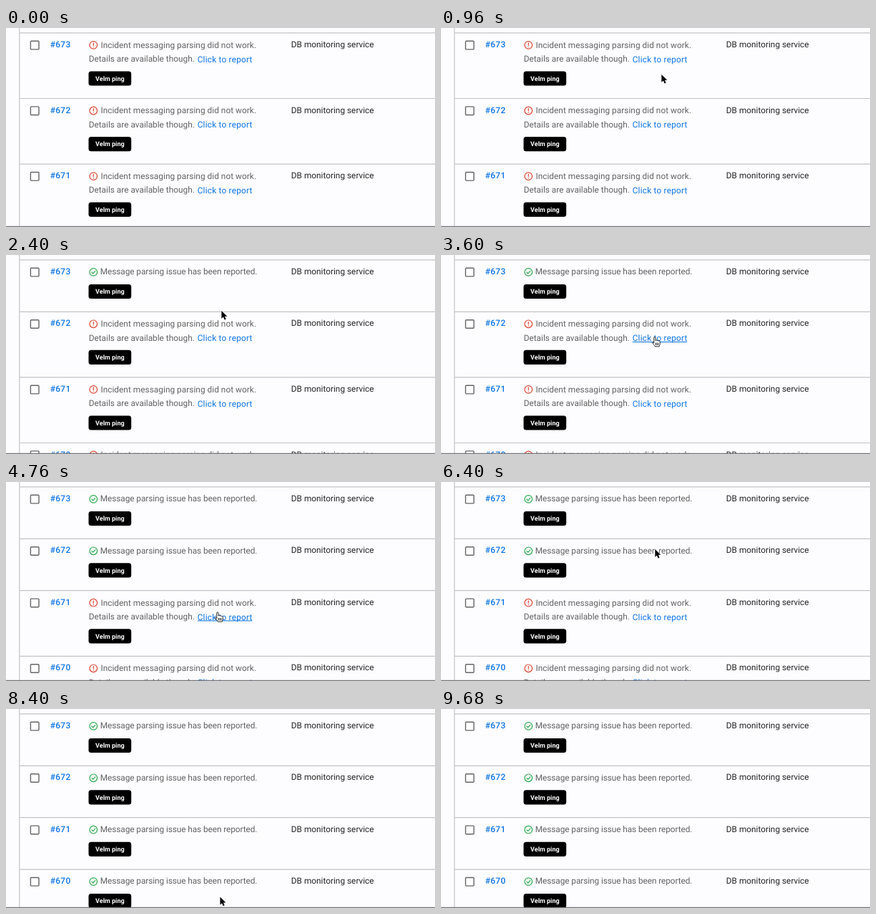
Animation, 600 px wide and 278 px high, one loop 9.76 s. Source, as an HTML page:

```html
<!DOCTYPE html>
<html lang="en">
<head>
<meta charset="utf-8">
<title>Incident list</title>
<style>
  html, body { margin: 0; width: 100%; height: 100%; overflow: hidden; background: #fdfcfe; }
  svg { display: block; width: 600px; height: 278px; }
  text { font: 11.85px Roboto, "Noto Sans", sans-serif; fill: #636363; white-space: pre; text-rendering: geometricPrecision; }
  .id { fill: #0b74e5; font-weight: 500; letter-spacing: .3px; }
  .link { fill: #0b74e5; letter-spacing: .2px; }
  .service { fill: #262626; }
  .open-text { letter-spacing: .03px; }
  .done-text { letter-spacing: -.08px; }
  .label { font-size: 9px; font-weight: 700; fill: #fff; text-anchor: middle; }
  .rule { stroke: #c3c3c7; stroke-width: 1.2; }
  .box { fill: #fff; stroke: #666; stroke-width: 1.4; }
  .icon { fill: none; stroke-width: 1.2; stroke-linecap: round; stroke-linejoin: round; }
  .warn { stroke: #dc4632; }
  .ok { stroke: #2aa84c; }
  .underline { stroke: #0b74e5; stroke-width: 1; }
</style>
</head>
<body>
<svg viewBox="0 0 600 278">
  <rect width="600" height="278" fill="#fdfcfe"/>
  <g id="rows"></g>
  <path class="rule" d="M18.8 0V278"/>
  <path d="M0 277.4H600" stroke="#77777b" stroke-width="1.2"/>
  <g id="cursor">
    <path id="arrow" transform="translate(.4 .9) scale(.93)"
      d="M0 0V11.8L2.7 9.3L4.6 13.6L6.7 12.7L4.9 8.5H8.6Z"
      stroke="#fff" paint-order="stroke" stroke-linejoin="round"/>
    <g id="hand" stroke="#111" stroke-width=".9" stroke-linejoin="round" stroke-linecap="round">
      <path fill="#fff" d="M-1.2 7.5V.4C-1.2-1.2 1.1-1.2 1.1.4V4.2C1.4 3.2 3.2 3.3 3.3 4.5C3.7 3.7 5.3 3.9 5.4 5C5.9 4.4 7.4 4.7 7.4 5.9V8.5C7.4 10 6.4 10.6 6.2 12.5H.3C-.1 10.8-2.2 9.5-3.2 7.6C-3.9 6.2-2.4 5.6-1.2 7.5Z"/>
      <path fill="none" d="M1.4 7.7V10.3M3.2 7.7V10.3M5 7.7V10.3"/>
    </g>
  </g>
</svg>
<script>
const LOOP = 9760, STEP = 40;
const TOP = 6.9, OPEN_HEIGHT = 91.6, DONE_HEIGHT = 72.4;
const REST = 480;
const clicks = [1720, 3840, 7080, 8280];

// Rows above a link are already reported when the pointer reaches it.
const linkY = i => TOP + i * DONE_HEIGHT + 36;

// Time, x and y: the pointer rests on each link before its click.
const visits = clicks.flatMap((t, i) => [[t - REST, 299, linkY(i)], [t, 299, linkY(i)]]);
const path = [
  ...visits,
  [0, 440, 292], [960, 308, 64],
  [2400, 301, 77], [2960, 299, linkY(1)],
  [4440, 299, linkY(1)], [4760, 296, linkY(2) - 5],
  [5480, 300, 240], [6400, 299, 93],
  [7680, 293, 213], [9200, 300, 292], [LOOP, 300, 292]
].sort((a, b) => a[0] - b[0]);

const $ = id => document.getElementById(id);
const show = (el, on) => el.style.display = on ? "" : "none";

const button = y => `
  <rect x="115.5" y="${y}" width="59.7" height="20.2" rx="3.5"/>
  <text class="label" x="145.4" y="${y + 13.4}">Velm ping</text>`;

const icon = (kind, mark) => `
  <g class="icon ${kind}"><circle cx="122.3" cy="17" r="5.3"/><path d="${mark}"/></g>`;

const rowMarkup = id => `
  <path class="rule" d="M19 0H600"/>
  <rect class="box" x="34.4" y="11.4" width="11.6" height="11.6" rx="1"/>
  <text class="id" x="61.8" y="20">#${id}</text>
  <text class="service" x="398.8" y="20">DB monitoring service</text>
  <g class="open">
    ${icon("warn", "M122.3 14.2V17.5M122.3 19.6V19.7")}
    <text class="open-text" x="132.4" y="20.9">Incident messaging parsing did not work.</text>
    <text x="115.7" y="40.3">Details are available though.</text>
    <text class="link" x="267.7" y="40.9">Click to report</text>
    <path class="underline" d="M268 42.2H344.3"/>
    ${button(53.5)}
  </g>
  <g class="done">
    ${icon("ok", "M119.9 17.1L121.7 18.9L124.8 15.5")}
    <text class="done-text" x="131.8" y="20.4">Message parsing issue has been reported.</text>
    ${button(34)}
  </g>`;

const rows = clicks.map((click, i) => {
  const el = document.createElementNS("http://www.w3.org/2000/svg", "g");
  el.innerHTML = rowMarkup(673 - i);
  $("rows").append(el);
  const part = name => el.querySelector(name);
  return { el, click, open: part(".open"), done: part(".done"), underline: part(".underline") };
});

function pointerAt(t) {
  const i = path.findIndex(p => p[0] > t);
  const [t0, x0, y0] = path[i - 1], [t1, x1, y1] = path[i];
  const u = (t - t0) / (t1 - t0), k = u * u * (3 - 2 * u);
  return [x0 + (x1 - x0) * k, y0 + (y1 - y0) * k];
}

function render(t) {
  const [x, y] = pointerAt(t);
  let top = TOP, overLink = false;
  for (const row of rows) {
    const done = t >= row.click;
    const hover = !done && x > 267 && x < 345 && y > top + 29 && y < top + 45;
    row.el.setAttribute("transform", `translate(0 ${top})`);
    show(row.open, !done);
    show(row.done, done);
    show(row.underline, hover);
    overLink ||= hover;
    top += done ? DONE_HEIGHT : OPEN_HEIGHT;
  }
  $("cursor").setAttribute("transform", `translate(${x} ${y})`);
  show($("arrow"), !overLink);
  show($("hand"), overLink);
}

const start = performance.now();
function tick() {
  const t = (performance.now() - start) % LOOP;
  render(Math.floor(t / STEP) * STEP);
  requestAnimationFrame(tick);
}
tick();
</script>
</body>
</html>
```
